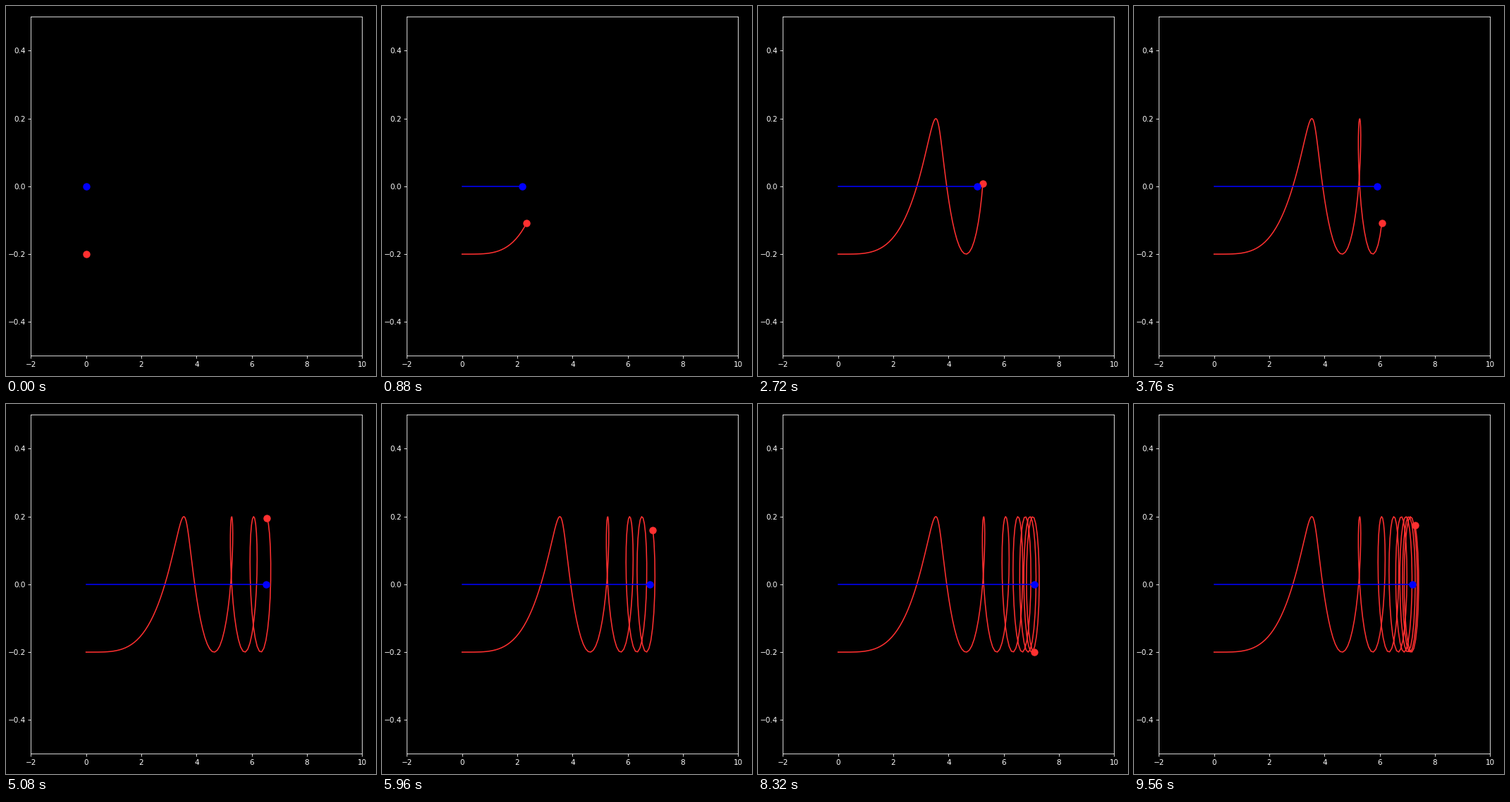
A matplotlib script for the animation above (9600 ms loop, 525 px wide and 525 px high).

```python
import math

import numpy as np
import matplotlib.pyplot as plt
from matplotlib.animation import FuncAnimation

SIZE, DPI = 525, 75
FRAMES, STEP_MS = 240, 40
RADIUS = 0.2
RED, BLUE = "#ff3030", "#0000ff"

# The hub slows down towards a limit; its spin rate equals its position.
LIMIT, RATE_START, RATE_END = 7.25, 0.388, 0.49
SUB = 40  # integration substeps per frame


def hub_speed(x, angle):
    drift = (LIMIT - x) * (RATE_START + (RATE_END - RATE_START) * x / LIMIT)
    # The uneven spin shakes the hub once it turns fast enough.
    shake = 0.38 / (1 + math.exp(-1.6 * (x - 4.6)))
    return drift + shake * math.cos(angle)


def simulate():
    dt = STEP_MS / 1000 / SUB
    x = angle = 0.0
    states = []
    for _ in range(FRAMES):
        states.append((x, angle))
        for _ in range(SUB):
            mid_x = x + hub_speed(x, angle) * dt / 2
            mid_angle = angle + x * dt / 2
            x += hub_speed(mid_x, mid_angle) * dt
            angle += mid_x * dt
    return np.array(states).T


hub_x, angles = simulate()
hub_y = np.zeros(FRAMES)
rim_x = hub_x + RADIUS * np.sin(angles)
rim_y = -RADIUS * np.cos(angles)

plt.style.use("dark_background")
fig = plt.figure(figsize=(SIZE / DPI, SIZE / DPI), dpi=DPI, facecolor="black")
left, right, top, bottom = 35.3, 505.3, 15.4, 496.4
ax = fig.add_axes([left / SIZE, 1 - bottom / SIZE,
                   (right - left) / SIZE, (bottom - top) / SIZE])
ax.set_xlim(-2, 10)
ax.set_ylim(-0.5, 0.5)
ax.set_yticks([-0.4, -0.2, 0, 0.2, 0.4])

rim_trail, = ax.plot([], [], color=RED, lw=1.5)
hub_trail, = ax.plot([], [], color=BLUE, lw=1.5)
rim_dot, = ax.plot([], [], "o", color=RED, ms=10, mew=0)
hub_dot, = ax.plot([], [], "o", color=BLUE, ms=10, mew=0)


def update(n):
    for trail, dot, x, y in ((rim_trail, rim_dot, rim_x, rim_y),
                             (hub_trail, hub_dot, hub_x, hub_y)):
        trail.set_data(x[:n + 1], y[:n + 1])
        dot.set_data(x[n:n + 1], y[n:n + 1])
    return rim_trail, hub_trail, rim_dot, hub_dot


anim = FuncAnimation(fig, update, frames=FRAMES, interval=STEP_MS,
                     init_func=lambda: update(0), repeat=True, repeat_delay=0)
plt.show()
```
